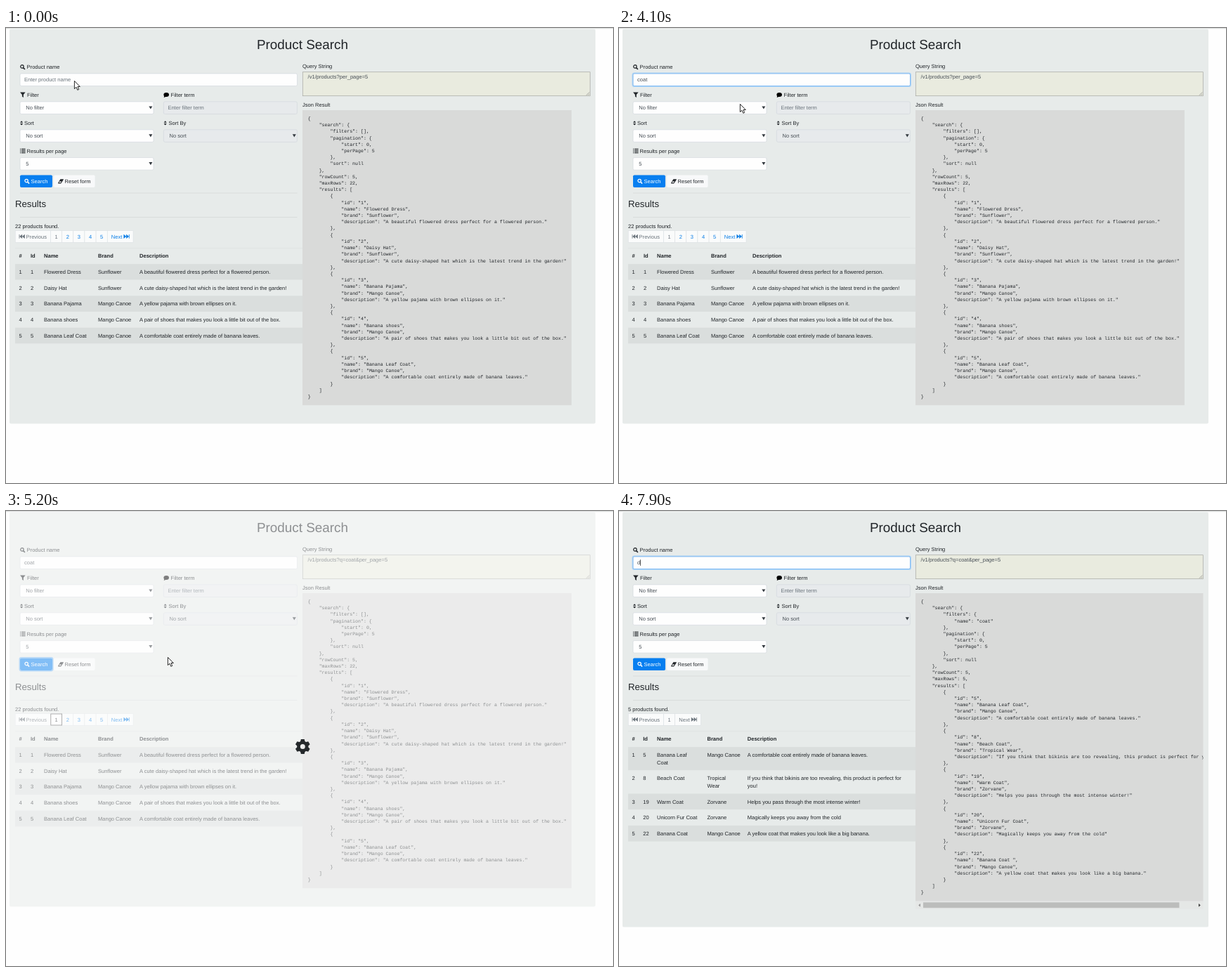
An HTML page that plays this animation: 864 px wide and 648 px high, repeating every 8 s.

```html
<!DOCTYPE html>
<html lang="en">
<head>
<meta charset="utf-8">
<title>Product Search</title>
<style>
  html, body { margin: 0; width: 100%; height: 100%; overflow: hidden; background: #fefefe; }
  svg { display: block; width: 864px; height: 648px; }
  text { font: 7.54px "Liberation Sans", Arial, sans-serif; fill: #212529; white-space: pre; text-rendering: geometricPrecision; }
  .h1 { font-size: 18.86px; }
  .h3 { font-size: 13.2px; }
  .b { font-weight: bold; }
  .mono { font: 6.6px "Liberation Mono", monospace; }
  .muted { fill: #6c757d; }
  .field { fill: #495057; }
  .link { fill: #087de6; }
  .white { fill: #fff; }
  .mid { text-anchor: middle; }
</style>
</head>
<body>
<svg id="stage" viewBox="0 0 864 648" xmlns="http://www.w3.org/2000/svg"></svg>
<script>
const LOOP = 8000, INK = '#212529', BLUE = '#087ff0';
const ADV = 3.96, LEAD = 9.21;

const text = (x, y, s, cls = '', id = '') => `<text x="${x}" y="${y}" class="${cls}" id="${id}">${s}</text>`;
const rect = (x, y, w, h, fill, more = '') => `<rect x="${x}" y="${y}" width="${w}" height="${h}" fill="${fill}" ${more}/>`;
const path = (d, fill = INK, more = '') => `<path d="${d}" fill="${fill}" ${more}/>`;
const at = (x, y, s) => `<g transform="translate(${x} ${y})">${s}</g>`;
const box = (x, y, w, h, fill = '#fefefe', line = '#ced4da') => rect(x, y, w, h, fill, `rx="1.9" stroke="${line}" stroke-width=".6"`);
const rule = y => rect(20, y, 394.5, .6, '#cfd3d2');

// Icons, each about 7 px wide from its top left corner
const lens = c => `<circle cx="2.9" cy="2.9" r="2.2" fill="none" stroke="${c}" stroke-width="1.2"/><path d="M4.6 4.6L6.9 6.9" stroke="${c}" stroke-width="1.5"/>`;
const funnel = path('M0 0H7.6L4.8 3.4V7.4L2.9 6V3.4Z');
const bubble = '<ellipse cx="3.8" cy="3" rx="3.8" ry="3"/><path d="M1 4L.3 6.9 4 5.6Z"/>';
const sorter = path('M0 2.9L2.1 .4 4.2 2.9ZM0 4.1H4.2L2.1 6.6Z');
const list = [0, 1.9, 3.8, 5.7].map(y => rect(0, y, 1.1, 1, INK) + rect(2, y, 5.6, 1, INK)).join('');
const eraser = path('M3.4 .3H7.6Q8.2 .5 7.8 1.1L4.6 6Q4.3 6.4 3.8 6.4H.4Q-.3 6.1 .2 5.4Z') + path('M1.4 4.9L2.4 3.4H5L3.8 5.3H1.5Z', '#f8f9fa');
const forward = c => path('M0 0L3.7 3V0L7.4 3V.2H8.2V6H7.4V3.2L3.7 6.2V3.2L0 6.2Z', c);
const back = c => `<g transform="translate(8.2 0) scale(-1 1)">${forward(c)}</g>`;

function dropdown(x, y, w, value, fill) {
  return box(x, y, w, 17.6, fill) + text(x + 8.2, y + 11.2, value, 'field') +
    path(`M${x + w - 6.6} ${y + 6.5}h5l-2.5 4.2z`, '#343a40');
}

function form() {
  return text(422, 29.8, 'Product Search', 'h1 mid') +
    at(20, 52, lens(INK)) + text(29.6, 58, 'Product name') +
    at(20, 91.6, funnel) + text(30, 97.8, 'Filter') + dropdown(20, 104.9, 190, 'No filter') +
    at(224.4, 92, bubble) + text(234.6, 97.8, 'Filter term') +
    box(224.4, 104.9, 190, 17.6, '#e7eaec') + text(230.4, 116.1, 'Enter filter term', 'muted') +
    at(20, 131.8, sorter) + text(26, 137.8, 'Sort') + dropdown(20, 144.8, 190, 'No sort') +
    at(224.6, 131.8, sorter) + text(231.5, 137.8, 'Sort By') + dropdown(224.4, 144.8, 190, 'No sort', '#e7eaec') +
    at(20, 171.7, list) + text(29.6, 177.7, 'Results per page') + dropdown(20, 184.6, 190, '5') +
    rect(20, 209.4, 46, 17.6, BLUE, 'rx="1.9" id="btn"') +
    rect(19.3, 208.7, 47.4, 19, 'none', 'rx="2.6" stroke="#74b6f4" stroke-width="1.5" id="btnRing"') +
    at(26.2, 214.7, lens('#fff')) + text(35.6, 220.9, 'Search', 'white') +
    rect(68, 209.4, 58.6, 17.6, '#f8f9fa', 'rx="1.9"') + at(74, 215, eraser) + text(83.6, 220.9, 'Reset form') +
    rule(234.7) + text(13, 255.3, 'Results', 'h3') + rule(269.2) +
    text(422, 57.4, 'Query String') + rect(422.3, 62.7, 409, 34, '#e9ebdf', 'stroke="#a5a7a2" stroke-width=".7"') +
    path('M826 95.8L830.4 91.4M828.4 95.8L830.4 93.8', 'none', 'stroke="#777" stroke-width=".6"') +
    text(429.6, 71.6, '', 'field', 'query') + text(422, 111.8, 'Json Result');
}

function nameInput() {
  return rect(19.3, 64.2, 395.9, 19.1, 'none', 'rx="2.6" stroke="#a9d3f6" stroke-width="1.6" id="ring"') +
    box(20, 64.9, 394.5, 17.6) + rect(20, 64.9, 394.5, 17.6, 'none', 'rx="1.9" stroke="#74b7f8" stroke-width=".8" id="edge"') +
    rect(26, 69, 14.3, 9.5, '#8fc0f5', 'id="mark"') +
    text(26, 76.1, '', '', 'value') + rect(26, 69.2, .7, 8.8, '#222', 'id="caret"');
}

function jsonLines(r) {
  const out = [];
  const add = (depth, s) => out.push([depth, s]);
  add(0, '{'); add(1, '"search": {');
  if (r.term) { add(2, '"filters": {'); add(3, `"name": "${r.term}"`); add(2, '},'); }
  else add(2, '"filters": [],');
  add(2, '"pagination": {'); add(3, '"start": 0,'); add(3, '"perPage": 5'); add(2, '},');
  add(2, '"sort": null'); add(1, '},');
  add(1, '"rowCount": 5,'); add(1, `"maxRows": ${r.total},`); add(1, '"results": [');
  r.items.forEach((item, i) => {
    const [id, name, brand, desc] = item.map(s => s.replace('|', ' '));
    add(2, '{');
    add(3, `"id": "${id}",`); add(3, `"name": "${name}",`);
    add(3, `"brand": "${brand}",`); add(3, `"description": "${desc}"`);
    add(2, i < 4 ? '},' : '}');
  });
  add(1, ']'); add(0, '}');
  return out;
}

function table(r) {
  let y = 336.1, s = rect(13, 313.5, 409, .6, '#d9dedf');
  ['#', 'Id', 'Name', 'Brand', 'Description'].forEach((h, i) => s += text(r.cols[i], 327.2, h, 'b'));
  r.items.forEach((item, n) => {
    const cells = [String(n + 1), ...item].map((c, i) => (i === 2 && !r.term ? c.replace('|', ' ') : c).split('|'));
    const h = 22.65 + 10.6 * (Math.max(...cells.map(c => c.length)) - 1);
    s += rect(13, y, 409, h, n % 2 ? '#e7ebea' : '#dadedd');
    cells.forEach((lines, i) => lines.forEach((l, k) => s += text(r.cols[i], y + 14 + k * 10.9, l)));
    y += h;
  });
  return s;
}

function pager(r) {
  const top = 288.7, cell = (x, w) => rect(x, top, w, 16.6, '#fafbfb', 'stroke="#dbe0e3" stroke-width=".6"');
  const last = r.term ? 1 : 5, end = 63.5 + 16.15 * last, live = r.term ? 'muted' : 'link';
  let s = cell(13.2, 50.3) + at(18.6, 293.8, back('#6c757d')) + text(28.6, 299.7, 'Previous', 'muted');
  for (let i = 1; i <= last; i++) {
    const x = 63.5 + 16.15 * (i - 1);
    s += cell(x, 16.15) + text(x + 8.1, 299.7, i, 'mid ' + (i > 1 ? 'link' : 'muted'));
  }
  return s + cell(end, 36.8) + text(end + 5.6, 299.7, 'Next', live) +
    at(end + 23.2, 293.8, forward(r.term ? '#6c757d' : '#087de6'));
}

function results(r) {
  const lines = jsonLines(r), h = lines.length * LEAD + 15, w = r.term ? 409.5 : 383;
  let s = rect(422, 117, w, h, '#d9dad9') + '<g clip-path="url(#pre)">';
  lines.forEach(([d, l], i) => s += text(429.8 + d * 4 * ADV, 130.9 + i * LEAD, l, 'mono'));
  s += '</g>';
  if (r.term) s += rect(422, 555.8, 409.5, 11, '#e5e7e6') + rect(433, 557.4, 364.5, 7.8, '#bcbdbc') +
    path('M429 559l-2.8 2.4 2.8 2.4z', '#999') + path('M825 559l2.8 2.4-2.8 2.4z', '#444');
  return s + text(13, 285.3, `${r.total} products found.`) + pager(r) + table(r);
}

const leaf = ['5', 'Banana Leaf| Coat'.replace('| ', '|'), 'Mango Canoe', 'A comfortable coat entirely made of banana leaves.'];
const all = {
  total: 22, cols: [18.5, 35, 54, 131, 190],
  items: [
    ['1', 'Flowered Dress', 'Sunflower', 'A beautiful flowered dress perfect for a flowered person.'],
    ['2', 'Daisy Hat', 'Sunflower', 'A cute daisy-shaped hat which is the latest trend in the garden!'],
    ['3', 'Banana Pajama', 'Mango Canoe', 'A yellow pajama with brown ellipses on it.'],
    ['4', 'Banana shoes', 'Mango Canoe', 'A pair of shoes that makes you look a little bit out of the box.'],
    leaf
  ]
};
const coats = {
  term: 'coat', total: 5, cols: [18.5, 34.2, 54, 125.5, 182.8],
  items: [
    leaf,
    ['8', 'Beach Coat', 'Tropical|Wear', 'If you think that bikinis are too revealing, this product is perfect for|you!'],
    ['19', 'Warm Coat', 'Zorvane', 'Helps you pass through the most intense winter!'],
    ['20', 'Unicorn Fur Coat', 'Zorvane', 'Magically keeps you away from the cold'],
    ['22', 'Banana Coat ', 'Mango Canoe', 'A yellow coat that makes you look like a big banana.']
  ]
};

const teeth = [0, 60, 120, 180, 240, 300].map(a => `<path d="M-3.4 -6.5L-2.4 -10.5H2.4L3.4 -6.5Z" transform="rotate(${a})"/>`).join('');
const gear = `<g id="gear" fill="#25292c">${teeth}<circle r="5.8" fill="none" stroke="#25292c" stroke-width="4.6"/></g>`;
const pen = 'stroke="#111" stroke-width=".9" stroke-linejoin="round"';
const pointers =
  `<g id="arrow">${path('M.4 .4V11.6L3 9.2 4.8 13.3 6.7 12.5 5 8.5H8.3Z', '#fff', pen)}</g>` +
  `<g id="beam">${[['#fff', 2], ['#222', 1]].map(([c, w]) => path('M-2.4 -5.5H-.8L0 -4.8 .8 -5.5H2.4M0 -4.8V4.8M-2.4 5.5H-.8L0 4.8 .8 5.5H2.4', 'none', `stroke="${c}" stroke-width="${w}"`)).join('')}</g>` +
  `<g id="hand">${path('M-2 -5Q-1.3 -6 -.6 -5V-1.6L3.4 -.8Q4.5 -.4 4.3 .8L3.6 5.5H-1.2L-3.7 1.6Q-3.8 .2 -2 1Z', '#fff', pen)}</g>`;

const stage = document.getElementById('stage');
stage.innerHTML = '<clipPath id="pre"><rect x="422" y="117" width="409.5" height="440"/></clipPath>' +
  rect(0, 0, 864, 648, '#fefefe') + rect(0, 0, 864, 1.2, '#dcdedd') +
  '<g id="page">' + rect(5, 1.8, 834, 561.6, '#e7ebea', 'rx="1.9" id="panel"') + form() + nameInput() +
  `<g id="all">${results(all)}</g><g id="coats">${results(coats)}</g>` +
  `<g id="first">${rect(63.8, 289, 15.8, 16, '#fefefe', 'stroke="#444" stroke-width=".8"')}${text(71.6, 299.7, '1', 'mid')}</g></g>` +
  gear + pointers;

const el = {};
stage.querySelectorAll('[id]').forEach(n => { if (n.id) el[n.id] = n; });
const show = (name, on) => el[name].setAttribute('display', on ? 'inline' : 'none');
const set = (name, key, v) => el[name].setAttribute(key, v);
const clamp = v => Math.max(0, Math.min(1, v));

// Pointer path: time, x, y, shape
const route = [
  [0, 97, 75, 'arrow'], [100, 99.5, 76, 'beam'], [400, 99.5, 76, 'beam'], [800, 411, 78, 'beam'], [1200, 411, 78, 'beam'],
  [1300, 198, 78, 'beam'], [4000, 198, 78, 'beam'], [4100, 172, 108, 'arrow'], [4600, 45, 211, 'hand'],
  [4700, 44, 215, 'hand'], [4900, 44, 215, 'hand'], [5000, 90, 206, 'arrow'], [5200, 230, 208, 'arrow'],
  [5300, 249.3, 233.6, 'arrow'], [5500, 249.3, 233.6, 'arrow'], [5600, 269, 232, 'arrow'], [5700, 217, 216, 'arrow'],
  [5800, 217, 216, 'arrow'], [6200, 66, 71, 'arrow'], [6600, 150, 304, 'arrow'], [6700, 150, 304, 'arrow'],
  [6800, 110, 352, 'arrow'], [7000, 72, 200, 'arrow'], [7100, 90, 62, 'beam'], [7200, 88, 67, 'beam'],
  [7500, 42, 74, 'beam'], [7600, 28, 74, 'beam'], [7800, 28, 74, 'none']
];

function movePointer(t) {
  let i = route.length - 1;
  while (route[i][0] > t) i--;
  const a = route[i], b = route[i + 1] || a;
  const k = b === a ? 0 : (t - a[0]) / (b[0] - a[0]);
  const x = a[1] + (b[1] - a[1]) * k, y = a[2] + (b[2] - a[2]) * k;
  for (const kind of ['arrow', 'beam', 'hand']) {
    show(kind, kind === a[3]);
    set(kind, 'transform', `translate(${x} ${y})`);
  }
}

function typed(t) {
  return t < 3100 ? '' : t < 3300 ? 'c' : t < 3500 ? 'coa' : t < 7800 ? 'coat' : 'd';
}

function caretOn(t) {
  if (t < 3100) return t >= 600 && (t < 1100 || (t >= 1700 && t < 2300) || t >= 2900);
  return t < 4100 || t >= 7800;
}

function draw(ms) {
  const t = Math.floor(ms / 100) * 100;
  const word = typed(t), found = t >= 5300, busy = t >= 4900 && !found;

  el.value.textContent = word || 'Enter product name';
  set('value', 'class', word ? 'field' : 'muted');
  const em = { c: .5, o: .556, a: .556, t: .278, d: .556 };
  set('caret', 'x', 26 + 7.54 * [...word].reduce((w, ch) => w + em[ch], 0));
  show('caret', caretOn(t));
  show('mark', t >= 7600 && t < 7800);

  const focus = t < 4800 ? clamp((t - 400) / 200) : t < 4900 ? .65 : clamp((t - 7400) / 300);
  set('ring', 'opacity', focus);
  set('edge', 'opacity', focus);
  set('btnRing', 'opacity', t < 4900 ? 0 : t < 7600 ? 1 : t < 7800 ? .5 : 0);
  set('btn', 'fill', t >= 4600 && t < 5000 ? '#0f70c8' : BLUE);

  el.query.textContent = t < 4800 ? '/v1/products?per_page=5' : (t < 4900 ? '' : '/') + 'v1/products?q=coat&per_page=5';
  show('all', !found);
  show('coats', found);
  show('first', busy);
  set('panel', 'height', found ? 590.8 : 561.6);

  set('page', 'opacity', busy ? 1 - Math.min(.5, (t - 4800) * .0017) : 1);
  show('gear', busy);
  set('gear', 'transform', `translate(422.3 335.5) rotate(${(t - 5200) * .18})`);
  movePointer(t);
}

function tick() {
  draw(performance.now() % LOOP);
  requestAnimationFrame(tick);
}
tick();
</script>
</body>
</html>
```
